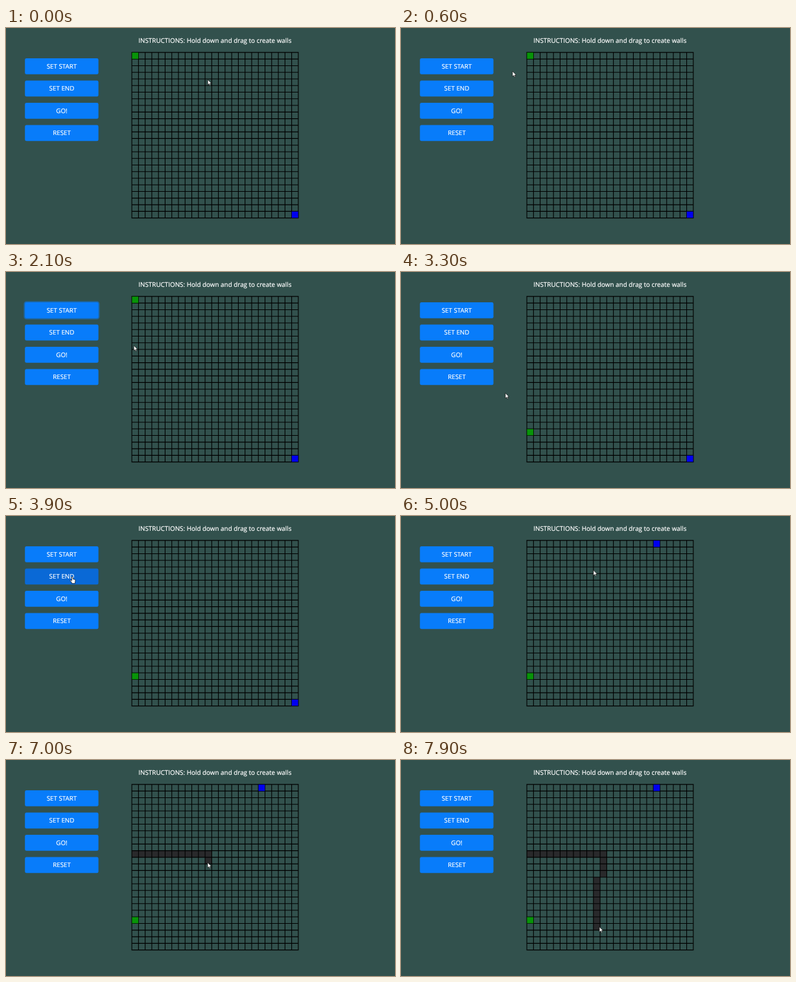
These frames come from a looping animation (600 by 335 pixels, 8000 ms). An HTML page:

```html
<!DOCTYPE html>
<html lang="en">
<head>
<meta charset="utf-8">
<title>Grid walls</title>
<style>
  html, body { margin: 0; width: 100%; height: 100%; overflow: hidden; background: #32514d; }
  svg { display: block; width: 600px; height: 335px; }
  text {
    font: 9.8px "Open Sans", "Noto Sans", sans-serif;
    fill: #fff; stroke: #fff; stroke-width: .2;
    text-anchor: middle; text-rendering: geometricPrecision;
  }
  .title { font-size: 9.87px; }
  .btn rect { fill: #087cfa; }
  .btn.hover rect { fill: #0a69d6; }
  .btn.focus rect { stroke: #0a7cf8; stroke-opacity: .5; stroke-width: 3.6; paint-order: stroke; }
  .wall { fill: #29292b; }
  .pointer { fill: #fff; stroke: #111; stroke-width: .7; stroke-linejoin: round; }
</style>
</head>
<body>
<svg viewBox="0 0 600 335">
  <text class="title" x="322.4" y="22.7">INSTRUCTIONS: Hold down and drag to create walls</text>
  <g id="buttons"></g>
  <g id="walls"></g>
  <path id="lines" stroke="#000" stroke-width="1.1" stroke-linecap="square"/>
  <g id="marks"></g>
  <path id="arrow" class="pointer" d="M0 0V8.2L1.9 6.5L3.1 9.2L4.5 8.6L3.3 6H5.8Z"/>
  <path id="hand" class="pointer" d="M-.6 .6Q.3 -.5 1.2 .6V3.8L4 4.4Q5.2 4.8 5 6L4.5 8.8V10.6H-.6V9.2L-3 6.2Q-2.8 4.9 -1.6 5.6L-.6 6.5Z"/>
</svg>
<script>
const LOOP = 8000, STEP = 100;
const N = 25, SIZE = 10.27, LEFT = 194.1, TOP = 37.9;
const BTN = { x: 29.2, y: 47.1, w: 113.4, h: 24.7, gap: 34.5 };
const START_CLICK = 1300, START_MOVE = 2900;
const END_CLICK = 4000, END_MOVE = 4600;
const DRAG = 6200, MOUSE_RATE = 20;

const $ = id => document.getElementById(id);
const onGrid = (col, row) => [LEFT + col * SIZE, TOP + row * SIZE];
const onButton = i => [107.5 - 5.5 * i, 61 + 33 * i];

function add(parent, tag, attrs) {
  const el = document.createElementNS("http://www.w3.org/2000/svg", tag);
  for (const k in attrs) el.setAttribute(k, attrs[k]);
  return parent.appendChild(el);
}

function addCell(parent, col, row, attrs) {
  const [x, y] = onGrid(col, row);
  return add(parent, "rect", { x, y, width: SIZE, height: SIZE, ...attrs });
}

// Eased pointer moves; the pointer rests between them.
const moves = [];
let last = onGrid(11.4, 4.1);
function move(from, to, target) {
  moves.push({ from, to, a: last, b: target });
  last = target;
}
move(100, 900, onButton(0));
move(1400, 2000, onGrid(.3, 7.4));
move(2100, 2700, onGrid(.5, 20.5));
move(3000, 3700, onButton(1));
move(4100, 4500, onGrid(19.5, .5));
move(4700, 5000, onGrid(10, 4.5));
move(5000, 5700, onGrid(.4, 10.6));
move(DRAG, 6850, onGrid(11.5, 10.5));
move(6850, 7200, onGrid(11.2, 13.8));
move(7200, 7220, onGrid(10.85, 14.2));
move(7220, 7750, onGrid(10.9, 21.5));

function pointerAt(t) {
  const { from, to, a, b } = moves.filter(m => m.from <= t).pop() || moves[0];
  const k = Math.min(1, Math.max(0, (t - from) / (to - from)));
  const e = k * k * (3 - 2 * k);
  return a.map((v, i) => v + (b[i] - v) * e);
}

const buttons = ["SET START", "SET END", "GO!", "RESET"].map((label, i) => {
  const y = BTN.y + i * BTN.gap;
  const el = add($("buttons"), "g", { class: "btn" });
  add(el, "rect", { x: BTN.x, y, width: BTN.w, height: BTN.h, rx: 2.4 });
  add(el, "text", { x: 86, y: y + 15.8 }).textContent = label;
  return { el, y };
});

let d = "";
for (let i = 0; i <= N; i++) {
  d += `M${onGrid(i, 0)}v${N * SIZE}M${onGrid(0, i)}h${N * SIZE}`;
}
$("lines").setAttribute("d", d);

// Each cell the dragged pointer enters becomes a wall from that moment on.
const walls = new Map();
for (let t = DRAG; t < LOOP; t += MOUSE_RATE) {
  const [x, y] = pointerAt(t);
  const cell = [Math.floor((x - LEFT) / SIZE), Math.floor((y - TOP) / SIZE)];
  const key = String(cell);
  if (!walls.has(key)) walls.set(key, { t, el: addCell($("walls"), ...cell, { class: "wall" }) });
}

// A marker cell shows in its first place until it is moved to the second.
function marker(fill, moved, before, after) {
  const [a, b] = [before, after].map(c =>
    addCell($("marks"), ...c, { fill, stroke: "#000", "stroke-opacity": .6, "stroke-width": .8 }));
  return t => {
    show(a, t < moved);
    show(b, t >= moved);
  };
}

function show(el, on) {
  el.style.display = on ? "" : "none";
}

const markers = [
  marker("#089408", START_MOVE, [0, 0], [0, 20]),
  marker("#0000f0", END_MOVE, [24, 24], [19, 0])
];

function focusedAt(t) {
  if (t >= START_CLICK && t < START_MOVE) return 0;
  if (t >= END_CLICK && t < END_MOVE) return 1;
  return -1;
}

function draw(t) {
  const [x, y] = pointerAt(t);
  const hovered = buttons.findIndex(b =>
    x > BTN.x && x < BTN.x + BTN.w && y > b.y && y < b.y + BTN.h);
  const focused = focusedAt(t);
  buttons.forEach((b, i) => {
    b.el.classList.toggle("hover", i === hovered);
    b.el.classList.toggle("focus", i === focused);
  });
  markers.forEach(update => update(t));
  walls.forEach(w => show(w.el, w.t <= t));
  show($("hand"), hovered >= 0);
  show($("arrow"), hovered < 0);
  $(hovered >= 0 ? "hand" : "arrow").setAttribute("transform", `translate(${x} ${y})`);
}

const origin = performance.now();
function tick() {
  const t = (performance.now() - origin) % LOOP;
  draw(Math.floor(t / STEP) * STEP);
  requestAnimationFrame(tick);
}
tick();
</script>
</body>
</html>
```
